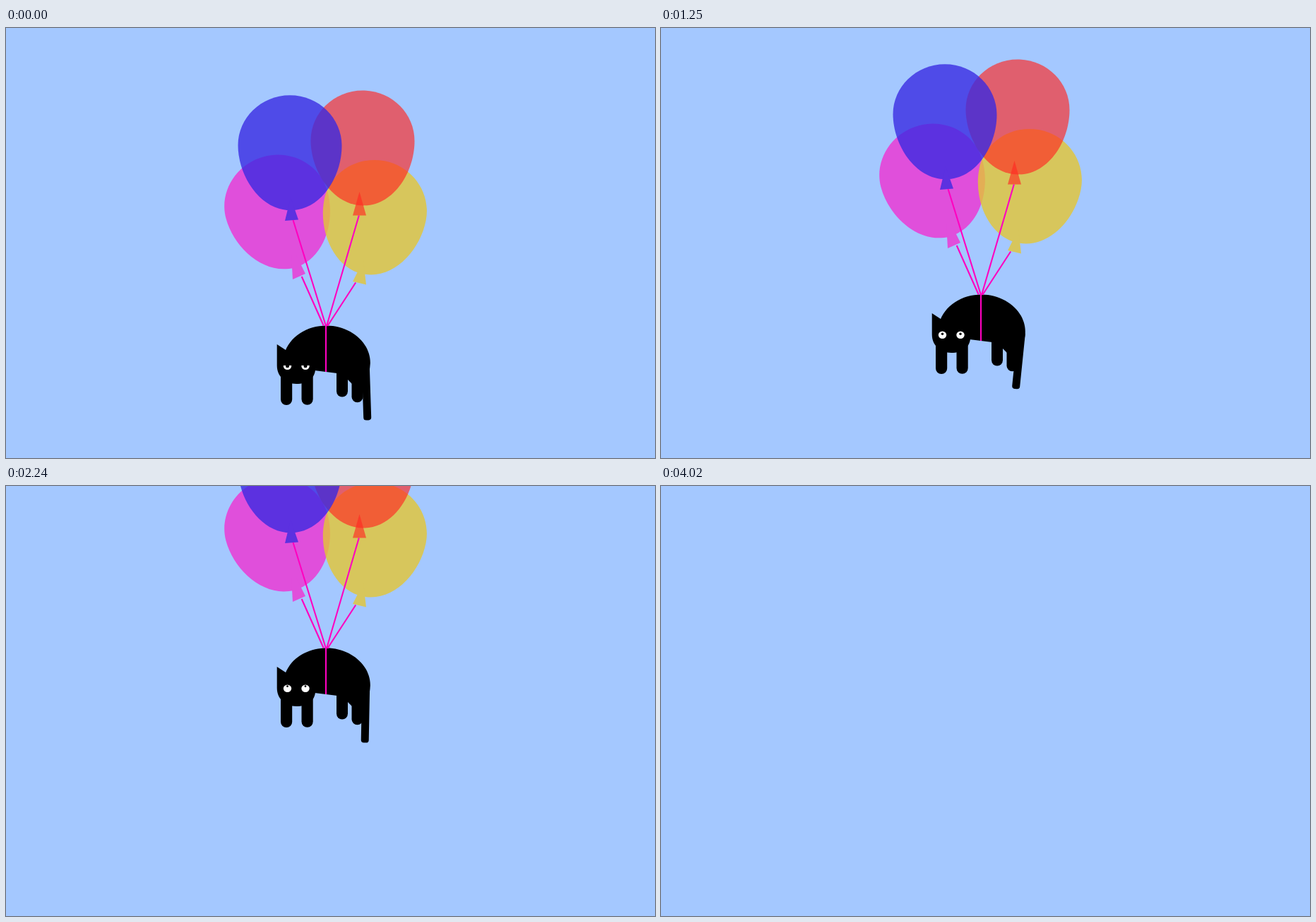
Write an HTML page that moves like this. It is 919 px wide and 609 px high and loops after 4190 ms.

```html
<!DOCTYPE html>
<html lang="en">
<head>
<meta charset="utf-8">
<title>Balloon cat</title>
<style>
  html, body { margin: 0; width: 100%; height: 100%; overflow: hidden; background: #a4c8ff; }
  svg { display: block; width: 100%; height: 100%; }
</style>
</head>
<body>
<svg viewBox="0 0 919 609">
  <defs>
    <path id="balloon" d="M0-70.500C41-70.500 73.500-38 73.500 1C73.500 45 44 92.500 1 92.500C-42 92.500-73.500 44-73.500 0C-73.500-38-41-70.500 0-70.500Z"/>
    <g id="eye">
      <ellipse rx="5.700" ry="5.200" fill="#fff"/>
      <circle class="pupil"/>
      <rect class="lid" x="-7" y="-7" width="14"/>
    </g>
  </defs>
  <g id="flight">
    <g fill="#f031d3" opacity=".8">
      <use href="#balloon" transform="translate(383.300 250.300) rotate(-15) scale(1.012 1)"/>
      <path d="M404 322L406 356L424 348L411 322Z"/>
    </g>
    <g fill="#e4c634" opacity=".8">
      <use href="#balloon" transform="translate(522.700 257.500) rotate(11)"/>
      <path d="M506 329L491 359L510 363.500Z"/>
    </g>
    <g fill="#ff2a23" fill-opacity=".66">
      <use href="#balloon" transform="translate(505 159)"/>
      <path d="M500.500 232L491 265.500H510Z"/>
    </g>
    <g fill="#3829e2" opacity=".78">
      <use href="#balloon" transform="translate(402 165.700)"/>
      <path d="M403 240L395 273L414 271.500Z"/>
    </g>

    <path d="M394 462C401 437 426 421.500 454 421.500C488 421.500 516.500 446 515.800 475C515.500 484 513 492 510 500L506 508H494L484 498L469 489L437 485L400 475Z"/>
    <path d="M383.700 448L396 456L437 470L438 484C437 496 427 504 411 504C395 504 383.700 493 383.700 478Z"/>
    <rect x="389" y="482" width="16.200" height="52" rx="8"/>
    <rect x="418.500" y="482" width="16.200" height="51.800" rx="8"/>
    <rect x="468" y="478" width="16" height="44.500" rx="8"/>
    <rect x="489.500" y="482" width="16" height="48.300" rx="8"/>
    <rect id="tail" x="504" y="474" width="11" height="81.500" rx="4"/>
    <use href="#eye" x="398.500" y="478.700"/>
    <use href="#eye" x="424" y="478.700"/>

    <path d="M406.500 272L453 422M499.800 265.500L454 422M418.700 352L449.700 421.500M495.200 360.500L455.300 422M453 421V487" fill="none" stroke="#ff00c0" stroke-width="2.100"/>
  </g>
</svg>
<script>
const LOOP = 4190, LAST = 45, STEP = 4020 / LAST;

// Key points as [step, value]
const rise = [[0, 0], [6, 9.3], [14, 44], [21, 124], [29, 268], [37, 427.7], [42, 523], [LAST, 562]];
const swing = [[0, 0], [6, 0], [15, 8], [29, .8], [37, 0], [LAST, 0]];

// Smooth curve through the key points
function curve(keys, x) {
  const last = keys.length - 1;
  const i = Math.max(0, keys.findIndex(k => k[0] >= x) - 1);
  const slope = j => {
    const a = keys[Math.max(j - 1, 0)], b = keys[Math.min(j + 1, last)];
    return (b[1] - a[1]) / (b[0] - a[0]);
  };
  const [x0, y0] = keys[i], [x1, y1] = keys[i + 1];
  const w = x1 - x0, u = (x - x0) / w, v = 1 - u;
  return y0 * v * v * (1 + 2 * u) + y1 * u * u * (3 - 2 * u)
    + w * u * v * (slope(i) * v - slope(i + 1) * u);
}

const clamp = x => Math.max(0, Math.min(1, x));
const flight = document.getElementById('flight');
const tail = document.getElementById('tail');
const pupil = document.querySelector('.pupil');
const lid = document.querySelector('.lid');

function draw(t) {
  const step = Math.min(LAST, Math.floor(t / STEP + .1));
  const sleepy = clamp(1 - step / 6);
  const lookUp = Math.sin(clamp((step - 6) / 28) * Math.PI / 2);
  flight.setAttribute('transform', `translate(0 ${-curve(rise, step)})`);
  tail.setAttribute('transform', `rotate(${curve(swing, step) - 1.9} 509.500 485)`);
  pupil.setAttribute('cy', -3.5 * lookUp);
  pupil.setAttribute('r', 2 + .5 * sleepy - .7 * lookUp);
  lid.setAttribute('height', 6.2 * sleepy);
}

const start = performance.now();
function tick() {
  draw((performance.now() - start) % LOOP);
  requestAnimationFrame(tick);
}
tick();
</script>
</body>
</html>
```
